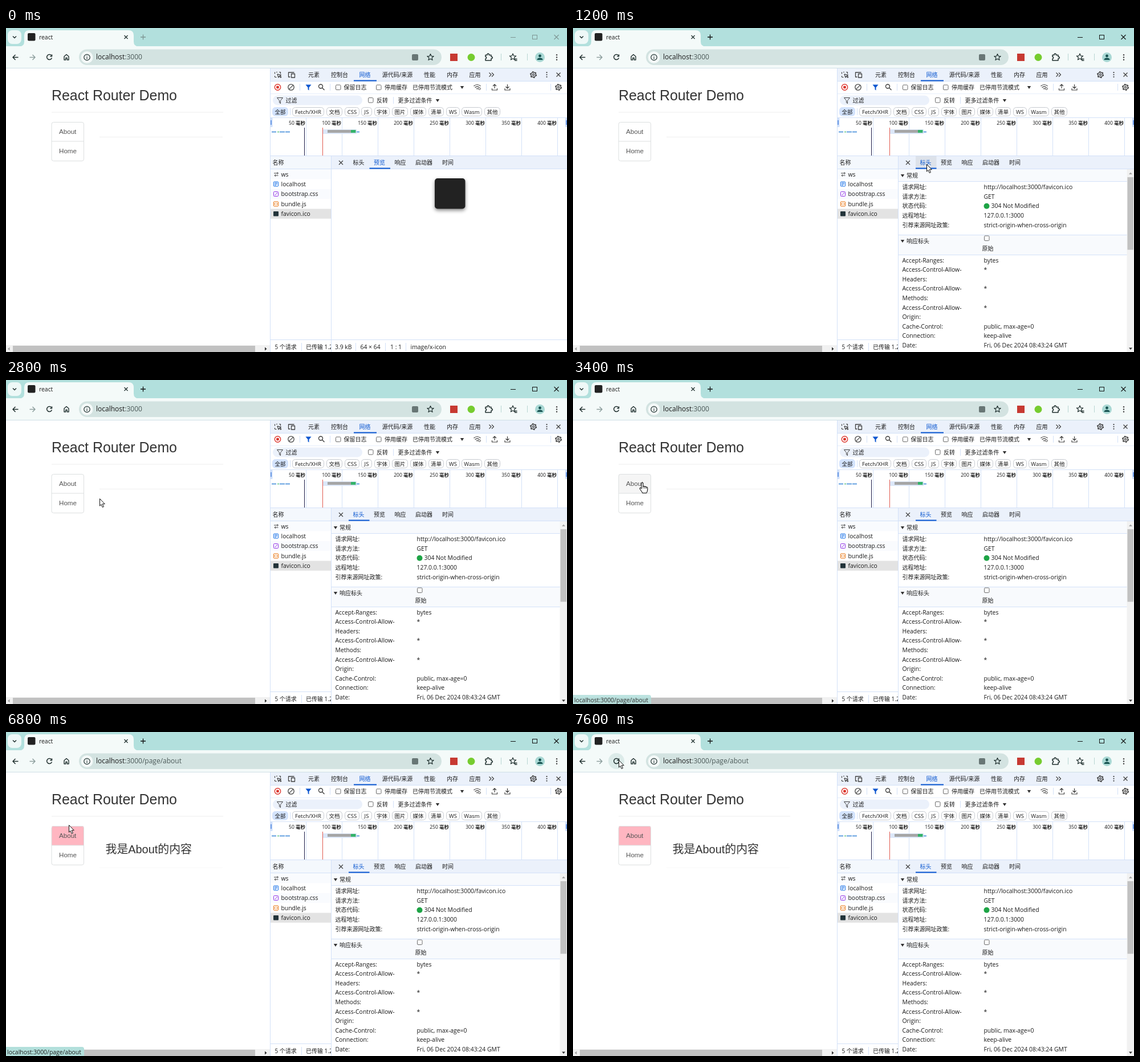
Recreate the animation shown at these times as an HTML page. Size 984x569 px, loop 8 s.

```html
<!DOCTYPE html>
<html lang="zh">
<head>
<meta charset="utf-8">
<title>React Router Demo</title>
<style>
  html, body { margin: 0; width: 100%; height: 100%; overflow: hidden; background: #fff; }
  svg { display: block; width: 984px; height: 569px; }
  text { font-family: "Open Sans", "Noto Sans CJK SC", "Noto Sans CJK", sans-serif; white-space: pre; }
  text.page { font-family: "Liberation Sans", "Noto Sans CJK SC", "Noto Sans CJK", sans-serif; }
</style>
</head>
<body>
<svg id="stage" viewBox="0 0 984 569"></svg>
<script>
const INK = '#1a1a1a', GREY = '#404040', BLUE = '#0b57d0', EDGE = '#d3e1f8', BAR = '#ebf1fb';
const LOOP = 8000, STEP = 100;

const rect = (x, y, w, h, fill, r = 0, extra = '') =>
  `<rect x="${x}" y="${y}" width="${w}" height="${h}" fill="${fill}" rx="${r}" ${extra}/>`;
const box = (x, y, w, h, color, r = 0, fill = 'none') =>
  rect(x, y, w, h, fill, r, `stroke="${color}"`);
const disc = (x, y, r, fill, extra = '') => `<circle cx="${x}" cy="${y}" r="${r}" fill="${fill}" ${extra}/>`;
const ring = (x, y, r, color, w = 1.2) => disc(x, y, r, 'none', `stroke="${color}" stroke-width="${w}"`);
const line = (d, color = GREY, w = 1.2) =>
  `<path d="${d}" fill="none" stroke="${color}" stroke-width="${w}" stroke-linejoin="round"/>`;
const shape = (d, fill = GREY) => `<path d="${d}" fill="${fill}"/>`;
const hasCjk = s => /[\u4e00-\u9fff]/.test(s);
// baselines sit on whole pixels to keep small type sharp
const text = (x, y, s, o = {}) =>
  `<text x="${x}" y="${Math.round(y)}" font-size="${o.size || (hasCjk(s) ? 10 : 10.4)}" fill="${o.fill || INK}"` +
  ` text-anchor="${o.anchor || 'start'}" class="${o.cls || ''}">${s}</text>`;
const mid = (x, y, s, o = {}) => text(x, y, s, { ...o, anchor: 'middle' });
const layer = (id, body) => `<g id="${id}">${body}</g>`;
const cross = (x, y, r, color, w) => line(`M${x - r} ${y - r}l${2 * r} ${2 * r}m0 ${-2 * r}l${-2 * r} ${2 * r}`, color, w);
const dots = (x, y, gap, r) => [-gap, 0, gap].map(d => disc(x, y + d, r, GREY)).join('');
const gear = (x, y) => ring(x, y, 4.2, GREY, 1.5) + ring(x, y, 1.6, GREY, 1.2) +
  disc(x, y, 5.3, 'none', `stroke="${GREY}" stroke-width="1.6" stroke-dasharray="2.400 3.150"`);
const check = (x, y) => box(x + .5, y + .5, 8.5, 8.5, '#6b6b6b', 1.5, '#fff');
const down = (x, y) => shape(`M${x - 3.2} ${y - 2.5}h6.4l-3.2 5z`, '#333');
const vline = (x, y1, y2, color = EDGE) => line(`M${x} ${y1}V${y2}`, color, 1);
const hline = (y, x1, x2, color = EDGE) => line(`M${x1} ${y}H${x2}`, color, 1);
const funnel = (x, y) => `M${x - 5} ${y - 5}h10l-4 5v5l-2-1.5v-3.5z`;
const star = (x, y, r) => 'M' + [...Array(10)].map((_, i) => {
  const a = i * Math.PI / 5 - Math.PI / 2, q = i % 2 ? r * .45 : r;
  return (x + q * Math.cos(a)).toFixed(2) + ' ' + (y + q * Math.sin(a)).toFixed(2);
}).join('L') + 'z';

function controls(color) {
  return line('M236 16h9M240.5 11.5v9', color, 1.3) + line('M885 16.5h9', color, 1) +
    box(923.5, 12.5, 8, 7, color) + cross(965.5, 16, 4, color, 1.1);
}

function browser() {
  const TOOL = '#f4faf9', DARK = '#20302f';
  return rect(0, 0, 984, 34, '#b2e0dd') + rect(3, 4, 24, 24, '#eef8f7', 8) +
    line('M12 14.5l3 3 3-3', DARK, 1.5) +
    shape('M23 32.5Q32 32.5 32 24V13Q32 4 41 4H215Q224 4 224 13V24Q224 32.5 233 32.5z', TOOL) +
    rect(0, 32, 984, 38, TOOL) + hline(70.5, 0, 984, '#cfdfe6') +
    rect(38, 9, 13.5, 13.5, '#222', 2) + text(58, 20, 'react') + cross(210.5, 16, 3, DARK, 1.3) +
    layer('hover', disc(76, 51, 14, '#dcebe9')) +
    line('M21.5 51.5H12.5M16.5 47l-4.5 4.5 4.5 4.5', DARK, 1.5) +
    line('M41.5 51.5h9M46.5 47l4.5 4.5-4.5 4.5', '#8fa09f', 1.5) +
    line('M79.6 48.2A4.5 4.5 0 1 0 80.4 52.5M80.5 46.5v3.2h-3.2', DARK, 1.5) +
    line('M102 50v6h2.8v-3.5h2.4V56h2.8v-6l-4-3.5z', DARK, 1.4) +
    rect(128, 37.5, 636, 27.5, '#d3e3e1', 13.75) + disc(142, 51.5, 10.5, TOOL) +
    ring(142, 51.5, 5.2, DARK) + line('M142 51v3.5M142 48.5v1.2', DARK) +
    text(158, 55, 'localhost<tspan fill="#4c5a59">:3000<tspan id="route">/page/about</tspan></tspan>', { size: 12 }) +
    rect(712, 46, 11, 11, '#687675', 2) + line(star(744.5, 51.5, 6), DARK) +
    rect(779, 45, 13, 13, '#c73a32') + disc(816, 51.5, 6.5, '#76cc2f') +
    line('M841 47.5h3v-1a1.6 1.6 0 0 1 3.2 0v1h3.8v3h.8a1.6 1.6 0 0 1 0 3.2h-.8v3.3h-10v-3a1.7 1.7 0 0 0 0-3.4z', DARK, 1.5) +
    vline(868.5, 45, 57, '#b9d6d4') + line(star(889, 51, 6), DARK) + line('M890.5 54.5h6M892 57h4.5', DARK, 1.3) +
    vline(914.5, 45, 57, '#b9d6d4') + disc(936.5, 51.5, 8.5, '#a9d8d4') +
    disc(936.5, 49, 2.4, '#15514f') + shape('M931.5 56q0-3.5 5-3.5t5 3.5z', '#15514f') + dots(966, 51.5, 4.2, 1.2);
}

function page() {
  const link = { cls: 'page', size: 11.62, fill: '#555' };
  return rect(0, 71, 463, 498, '#fff') +
    text(80, 127, 'React Router Demo', { cls: 'page', size: 24.9, fill: '#333' }) +
    hline(148, 80, 381, '#eee') + layer('over', rect(80, 165, 56.5, 34, '#f5f5f5', 3)) +
    layer('empty', hline(191.5, 164, 380, '#eee')) +
    layer('content', shape('M80 199V168Q80 165 83 165H133.5Q136.5 165 136.5 168V199z', '#ffb6c1') +
      text(174.5, 213, '我是About的内容', { cls: 'page', size: 19.9, fill: '#333' }) + hline(238, 164, 380, '#f8f8f8')) +
    box(80, 165.5, 56.5, 68, '#dcdfe0', 3.5) + hline(199, 80, 136.5, '#dcdfe0') +
    text(93, 186, 'About', link) + text(93, 220, 'Home', link) +
    rect(0, 557, 463, 12, '#f1f1f1') + rect(12, 558, 425, 11, '#c1c1c1') +
    shape('M6.5 560.5v6l-3.5-3z', '#a3a3a3') + shape('M454 560.5v6l3.5-3z', '#333');
}

function toolbars() {
  const tabs = [[540, '元素'], [585, '控制台'], [629.5, '网络'], [686.5, '源代码/来源'], [743, '性能'], [783, '内存'], [822.5, '应用']];
  const chips = [[467, 28, '全部'], [502, 56, 'Fetch/XHR'], [562, 28, '文档'], [594, 26, 'CSS'], [623, 19, 'JS'], [646, 27, '字体'],
    [677, 28, '图片'], [709, 28, '媒体'], [741, 27, '清单'], [772, 24, 'WS'], [799, 36, 'Wasm'], [839, 28, '其他']];
  return rect(463, 71, 521, 498, '#fff') + rect(463, 71, 521, 22, BAR) + hline(93.5, 463, 984) +
    line('M474.5 86.5h-3M471.5 84v2M471.5 77.5v3M474 77.5h2M479 77.5h2.5v3') +
    line('M476 81l2 6 1.3-2.3 2.5 2.5 1-1-2.5-2.5 2.2-1z') +
    line('M495 86h3.5M495.5 85.5v-7.5h10M500.5 80.5h6v6.5h-6z', GREY, 1.3) +
    tabs.map(([x, s]) => mid(x, 86, s, { fill: s === '网络' ? BLUE : INK })).join('') + rect(610, 91.5, 40, 2, BLUE) +
    line('M847.5 78.5l3.5 3.5-3.5 3.5M852 78.5l3.5 3.5-3.5 3.5') +
    gear(925, 82) + dots(948.5, 82, 3.8, 1.1) + cross(969, 82, 3.5, GREY, 1.3) +
    ring(476.5, 104, 5.2, '#dc362e', 1.4) + rect(474.2, 101.7, 4.6, 4.6, '#dc362e', 1) +
    ring(500, 104, 5.2, GREY, 1.3) + line('M496.3 107.7l7.4-7.4') + vline(515.5, 98, 110) +
    shape(funnel(530.5, 104.5), BLUE) + ring(552, 102.5, 3.5, GREY, 1.4) + line('M554.5 105l4 4', GREY, 1.4) + vline(568.5, 98, 110) +
    check(578, 99.5) + text(592.5, 108, '保留日志') + check(649, 99.5) + text(664, 108, '停用缓存') +
    text(713, 108, '已停用节流模式') + down(800, 104.5) +
    line('M820.5 102q6-5 12 0M822.5 104.5q4-3 7-.5M825 107q1.5-1.2 3 0') + ring(830.5, 106.5, 1.8, GREY, 1) +
    vline(842.5, 98, 110) + line('M857 106v-7M854 102l3-3 3 3M852.5 106v3h9v-3') + line('M879.5 99v7M876.5 103l3 3 3-3M875 106v3h9v-3') +
    vline(955.5, 98, 110) + gear(969, 104) + hline(115.5, 463, 984, '#e6eefb') +
    rect(468, 118.5, 157, 17, '#ebf1fb', 8.5) + line(funnel(480.5, 127.5), GREY, 1) + text(490.5, 131, '过滤') +
    check(635, 122) + text(650, 131, '反转') + vline(679.5, 121, 133) + text(687.5, 131, '更多过滤条件') + down(757, 127.5) +
    chips.map(([x, w, s], i) => box(x + .5, 139.5, w - 1, 15, i ? '#c6cad0' : '#d3e3fd', 5, i ? '#fff' : '#d3e3fd') +
      mid(x + w / 2, 151, s, { size: 9.5 })).join('') + vline(498.5, 141, 153);
}

function timeline() {
  const bars = [[466, 8], [480, 9], [490, 8], [615, 5]];
  const ticks = [1, 2, 3, 4, 5, 6, 7, 8].map(i => {
    const x = 463.5 + i * 63;
    return vline(x, 158, 224) +
      text(x - 1.5, 170, `${i * 50} <tspan font-weight="700">毫秒</tspan>`, { size: 8.5, anchor: 'end' });
  });
  return hline(157.5, 463, 984) + ticks.join('') +
    rect(463, 158, 4.5, 16, '#cfe0fb', 1) + vline(465, 162, 170, BLUE) +
    rect(981, 158, 3, 16, '#cfe0fb', 1) + vline(983, 162, 170, BLUE) +
    bars.map(([x, w]) => rect(x, 181.5, w, 2, '#63a0e0')).join('') + rect(476, 181.5, 3, 2, '#7ccf9a') +
    rect(556, 178, 59, 8, '#dce7f8') + rect(564, 179, 41, 5, '#a6a6a6') + rect(605, 179, 8.5, 5, '#34b36a') +
    vline(523.5, 175, 224, '#1c1c4a') + vline(555.5, 175, 224, '#e05a50') + hline(224.5, 463, 984);
}

function requests() {
  const rows = ['ws', 'localhost', 'bootstrap.css', 'bundle.js', 'favicon.ico'];
  const tags = [[274, '#1a73e8', 'M471 272h5M471 274h5M471 276h3'], [291.5, '#9334e6', 'M471.5 294l4.5-5'],
    [309, '#e8710a', 'M472.5 307l-1.5 2 1.5 2M474.5 307l1.5 2-1.5 2']];
  return rect(463, 225, 107, 22, '#f4f8fd') + text(467.5, 240, '名称') + hline(247.5, 463, 570) +
    rect(464, 248, 106, 17.4, '#f9fbfe') + rect(464, 282.8, 106, 17.4, '#f9fbfe') + rect(464, 317.6, 106, 17.2, '#e3e3e3') +
    rows.map((s, i) => text(482.5, 260.5 + i * 17.35, s)).join('') +
    line('M470 255h7M475.5 253l2 2-2 2M477.5 259h-6M473 257.2l-2 1.8 2 1.8', GREY, 1) +
    tags.map(([y, c, d]) => box(469.5, y - 4, 8, 8, c, 1) + line(d, c, 1)).join('') +
    rect(469, 322, 9, 8.5, '#23343a', 1) +
    hline(547.5, 463, 570) + text(471.5, 564, '5 个请求') + vline(518.5, 553, 567) + text(526, 564, '已传输 1.2');
}

function panelTabs() {
  const tabs = [[618.5, '标头'], [655, '预览'], [691.5, '响应'], [733, '启动器'], [775, '时间']];
  const plain = (i, fill = INK) => mid(tabs[i][0], 240, tabs[i][1], { fill });
  const active = (i, x) => rect(x, 245.5, 36.5, 2, BLUE) + plain(i, BLUE);
  return rect(570, 225, 414, 344, '#fff') + rect(571, 225, 413, 22, BAR) + hline(247.5, 570, 984) +
    layer('tabHover', rect(601, 225, 36.5, 22, '#dde2ea')) + cross(587.5, 236.5, 3.5, GREY, 1.2) +
    [2, 3, 4].map(i => plain(i)).join('') +
    layer('preview', plain(0) + active(1, 637.5) + previewBody()) +
    layer('headers', active(0, 601) + plain(1) + headersBody()) + vline(570.5, 225, 569);
}

function previewBody() {
  const facts = [[577, '3.9 kB'], [621.5, '64 × 64'], [674, '1 : 1'], [709.5, 'image/x-icon']];
  return rect(752, 264, 53.5, 53.5, '#222', 5, 'style="filter:drop-shadow(0 3px 3px #0007)"') +
    hline(547.5, 570, 984) + facts.map(([x, s]) => text(x, 564, s)).join('') +
    [613.5, 665.5, 701.5].map(x => vline(x, 553, 567)).join('');
}

function headersBody() {
  const general = [['请求网址:', 'http://localhost:3000/favicon.ico'], ['请求方法:', 'GET'], ['状态代码:', '304 Not Modified'],
    ['远程地址:', '127.0.0.1:3000'], ['引荐来源网址政策:', 'strict-origin-when-cross-origin']];
  const response = [['Accept-Ranges:', 'bytes'], ['Access-Control-Allow-', '*'], ['Headers:', ''], ['Access-Control-Allow-', '*'],
    ['Methods:', ''], ['Access-Control-Allow-', '*'], ['Origin:', ''], ['Cache-Control:', 'public, max-age=0'],
    ['Connection:', 'keep-alive'], ['Date:', 'Fri, 06 Dec 2024 08:43:24 GMT']];
  const list = (rows, y) => rows.map(([k, v], i) =>
    text(577.5, y + i * 16.55, k) + text(v.startsWith('304') ? 733.5 : 720.5, y + i * 16.55, v)).join('');
  return rect(571, 248, 401, 21, '#f8fafd') + hline(269.5, 571, 972) + down(578, 259.5) + text(585, 263, '常规') +
    list(general, 283.3) + disc(725.5, 312.8, 5, '#1ea446') +
    rect(571, 363, 401, 35, '#f8fafd') + hline(363.5, 571, 972) + hline(398.5, 571, 972) + down(578, 374.5) + text(585, 378, '响应标头') +
    check(721, 364.5) + text(717.5, 391, '原始') + list(response, 411.8) +
    rect(971.5, 248, 12.5, 321, '#f1f1f1') + rect(972.5, 262, 10.5, 127.5, '#c1c1c1') +
    shape('M975 257h6l-3-3.5z', '#a3a3a3') + shape('M975 561.5h6l-3 3.5z', '#333');
}

const bubble = shape('M0 553H133Q137 553 137 557V569H0z', '#b2dfdb') + text(2, 566, 'localhost:3000/page/about');
const arrow = '<path d="M.5 .5V13.2L3 10.5L5.2 15.5L7.4 14.5L5.2 9.7H9.3z" fill="#fff" stroke="#111"/>';
const hand = '<path d="M2.5 1.2Q4 -.8 5.5 1.2V7Q7.5 5.8 8.3 7.4Q10 6.5 10.9 8.1Q13 7.5 13.2 9.7V13Q13 16 11.3 18.5H4.5Q3 15.5 .5 12.5Q-1.2 9.8 .5 9.3Q1.5 9.1 2.5 10.5z" fill="#fff" stroke="#111" stroke-width="1.1"/>' +
  line('M5.5 7v3.5M8.3 7.8v3M10.9 8.5v2.5', '#111', .8);

const stage = document.getElementById('stage');
stage.innerHTML = browser() + layer('idle', controls('#7d9593')) + layer('focus', controls('#111')) +
  page() + toolbars() + timeline() + requests() + panelTabs() + vline(463.5, 71, 569) +
  layer('status', bubble) + layer('arrow', arrow) + layer('hand', hand);

// layer id, shown from, shown until
const spans = [
  ['idle', 0, 1100], ['focus', 1100, LOOP],
  ['preview', 0, 1100], ['headers', 1100, LOOP], ['tabHover', 900, 1700],
  ['over', 3100, 3800], ['empty', 0, 3800], ['content', 3800, LOOP], ['route', 3800, LOOP],
  ['status', 3200, 7100], ['hover', 7400, LOOP]
];
// start time, then one pointer position per step
const moves = [
  [200, [[963, 158], [944, 244], [854, 284], [748, 298], [680, 298], [633, 283], [624, 262], [620, 246], [620, 239]]],
  [1600, [[619, 246], [612, 272], [593, 318], [556, 367], [513, 387], [436, 393], [360, 342], [263, 272], [246, 259]]],
  [2600, [[229, 252], [184, 223], [164, 208], [161, 205], [148, 194], [132, 187], [125, 183], [120, 181], [117.5, 180]]],
  [6800, [[110, 163], [100, 143], [86, 118], [75, 103], [70, 88], [75, 78], [79, 70], [80, 57], [80, 49]]]
];
const byId = Object.fromEntries([...stage.querySelectorAll('[id]')].map(e => [e.id, e]));
const show = (id, on) => { byId[id].style.display = on ? '' : 'none'; };

function pointer(t) {
  const move = moves.filter(m => m[0] <= t).pop();
  if (!move) return null;
  const [start, path] = move;
  return path[Math.min(path.length - 1, Math.floor((t - start) / STEP))];
}

function draw(t) {
  for (const [id, from, to] of spans) show(id, t >= from && t < to);
  const p = pointer(t), onLink = t >= 3100 && t < 6800;
  show('arrow', p && !onLink);
  show('hand', onLink);
  if (p) byId[onLink ? 'hand' : 'arrow'].setAttribute('transform', `translate(${p[0]} ${p[1]})`);
  byId.status.style.opacity = t < 3300 ? .4 : t < 3500 ? .85 : t < 7000 ? 1 : .5;
}

const t0 = performance.now();
function tick() {
  draw((performance.now() - t0) % LOOP);
  requestAnimationFrame(tick);
}
tick();
</script>
</body>
</html>
```
